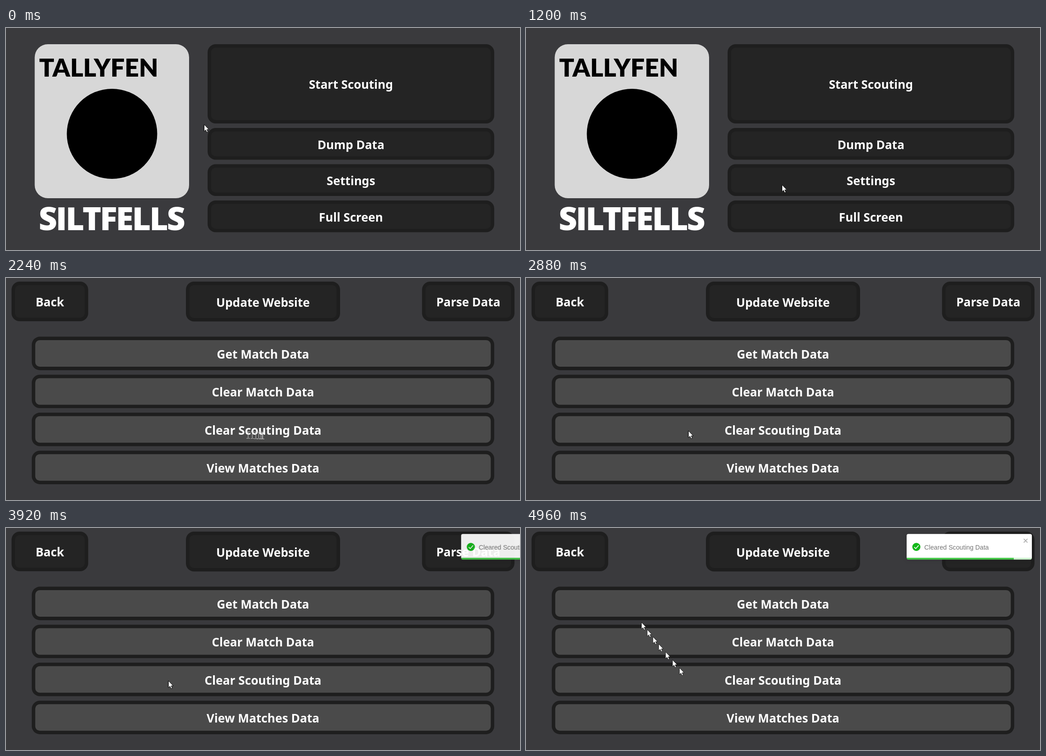
Animation of 1137 by 493 pixels, one loop 5.04 s. Source, as an HTML page:

```html
<!DOCTYPE html>
<html lang="en">
<head>
<meta charset="utf-8">
<title>Scouting menu</title>
<style>
  html, body { margin: 0; width: 100%; height: 100%; overflow: hidden; background: #3a3a3d; }
  svg { display: block; width: 1137px; height: 493px; }
  .label { font: 700 26.2px "Noto Sans", "Open Sans", sans-serif; fill: #fff; text-anchor: middle; }
  .title { font: 900 55px Lato, sans-serif; text-anchor: middle; }
  .season { font: 800 71px "Open Sans", sans-serif; letter-spacing: -3px; fill: #fff; text-anchor: middle; }
  .note { font: 14.2px "Liberation Sans", Arial, sans-serif; fill: #757575; }
  #toast { filter: drop-shadow(0 1px 4px rgba(0, 0, 0, .15)); }
  #bar { transform-origin: 842px 0; }
</style>
</head>
<body>
<svg viewBox="0 0 1137 493">
  <defs>
    <path id="arrow" d="M.4 .4V15.4L3.7 12.3L6.2 17.6L8.7 16.5L6.3 11.4H10.8Z"
          fill="#fff" stroke="#111" stroke-width=".9"/>
    <path id="beam" d="M-1.5 -5.5H1.3M2.7 -5.5H5.5M2 -5V9M-1.5 9.5H1.3M2.7 9.5H5.5"
          fill="none" stroke="#c4c4c4" stroke-width="1.1"/>
    <clipPath id="card"><rect x="842" y="13.3" width="277" height="57" rx="4"/></clipPath>
  </defs>

  <g id="home">
    <rect x="63.5" y="36" width="341.5" height="342" rx="29" fill="#d7d7d7"/>
    <circle cx="234.5" cy="235" r="100"/>
    <text class="title" x="205" y="108">TALLYFEN</text>
    <text class="season" x="233" y="449">SILTFELLS</text>
  </g>
  <g id="menu"></g>

  <g id="toast">
    <g clip-path="url(#card)">
      <rect x="842" y="13" width="277" height="58" fill="#fff"/>
      <rect x="842" y="66.2" width="277" height="5" fill="#cdf2ce"/>
      <rect id="bar" x="842" y="66.2" width="277" height="5" fill="#46c84a"/>
    </g>
    <circle cx="863.5" cy="42" r="9" fill="#14b81a"/>
    <path d="M858.8 42.4L862.2 45.8L868.5 38.6" fill="none" stroke="#fff" stroke-width="1.6"/>
    <text class="note" x="881" y="47.5">Cleared Scouting Data</text>
    <path d="M1101 24L1109.3 32.3M1109.3 24L1101 32.3" stroke="#aaa" stroke-width="1.7"/>
  </g>
  <g id="pointer"></g>
</svg>

<script>
const LOOP = 5040, TICK = 80, MENU_AT = 1280;
const TRAIL = 7, TRAIL_GAP = TICK / 3;
const $ = id => document.getElementById(id);

const DARK = '#242424', GREY = '#4a4a4a';
const button = (label, x, y, w, h, fill = DARK) => `
  <rect x="${x}" y="${y}" width="${w}" height="${h}" rx="18" fill="#1e1e1e"/>
  <rect x="${x + 7.7}" y="${y + 7.7}" width="${w - 15.4}" height="${h - 15.4}" rx="10" fill="${fill}"/>
  <text class="label" x="${x + w / 2}" y="${y + h / 2 + 11.3}">${label}</text>`;

$('home').insertAdjacentHTML('beforeend',
  button('Start Scouting', 446, 36, 634, 176) +
  ['Dump Data', 'Settings', 'Full Screen']
    .map((label, i) => button(label, 446, 222 + i * 80.5, 634, 70.5)).join(''));

$('menu').innerHTML =
  button('Back', 12.3, 8, 169.5, 88) +
  button('Update Website', 398, 8, 341, 88.5) +
  button('Parse Data', 920.3, 8, 204.5, 88) +
  ['Get Match Data', 'Clear Match Data', 'Clear Scouting Data', 'View Matches Data']
    .map((label, i) => button(label, 57, 130.3 + i * 84.4, 1023, 74.4, GREY)).join('');

$('pointer').innerHTML = '<use/>'.repeat(TRAIL);
const copies = [...$('pointer').children];

// Pointer stops: time, x, y, and whether the way there is eased.
const stops = [
  [80, 438, 214], [720, 566, 348, true],
  [2080, 566, 348], [2720, 359, 339, true],
  [4767, 359, 339], [4800, 339, 310], [4880, 293, 257], [4960, 255, 209]
];

function pointerAt(t) {
  const i = stops.findIndex(stop => t <= stop[0]);
  if (i < 1) return stops[i < 0 ? stops.length - 1 : 0].slice(1, 3);
  const [t0, x0, y0] = stops[i - 1], [t1, x1, y1, eased] = stops[i];
  let p = (t - t0) / (t1 - t0);
  if (eased) p = p * p * (3 - 2 * p);
  return [x0 + (x1 - x0) * p, y0 + (y1 - y0) * p];
}

const slide = (x, offset, opacity = 1) => ({
  transform: `translateX(${x}px)`, offset, opacity, easing: 'cubic-bezier(.215,.61,.355,1)'
});
const animations = [
  $('toast').animate(
    [slide(2598, 0, 0), slide(-22, .6), slide(8.7, .75), slide(-4.3, .9), slide(0, 1)],
    { delay: 3740, duration: 500, fill: 'both' }),
  $('bar').animate(
    [{ transform: 'scaleX(1)' }, { transform: 'scaleX(0)' }],
    { delay: 4240, duration: 5000, fill: 'both' })
];
animations.forEach(a => a.pause());

function draw(t) {
  const onMenu = t >= MENU_AT;
  $('home').style.display = onMenu ? 'none' : '';
  $('menu').style.display = onMenu ? '' : 'none';
  animations.forEach(a => a.currentTime = t);

  const overText = onMenu && pointerAt(t)[0] > 438;
  copies.forEach((copy, i) => {
    copy.setAttribute('href', overText ? '#beam' : '#arrow');
    copy.setAttribute('transform', `translate(${pointerAt(t - i * TRAIL_GAP)})`);
  });
}

const start = performance.now();
function frame() {
  const t = (performance.now() - start) % LOOP;
  draw(Math.floor(t / TICK) * TICK);
  requestAnimationFrame(frame);
}
frame();
</script>
</body>
</html>
```
